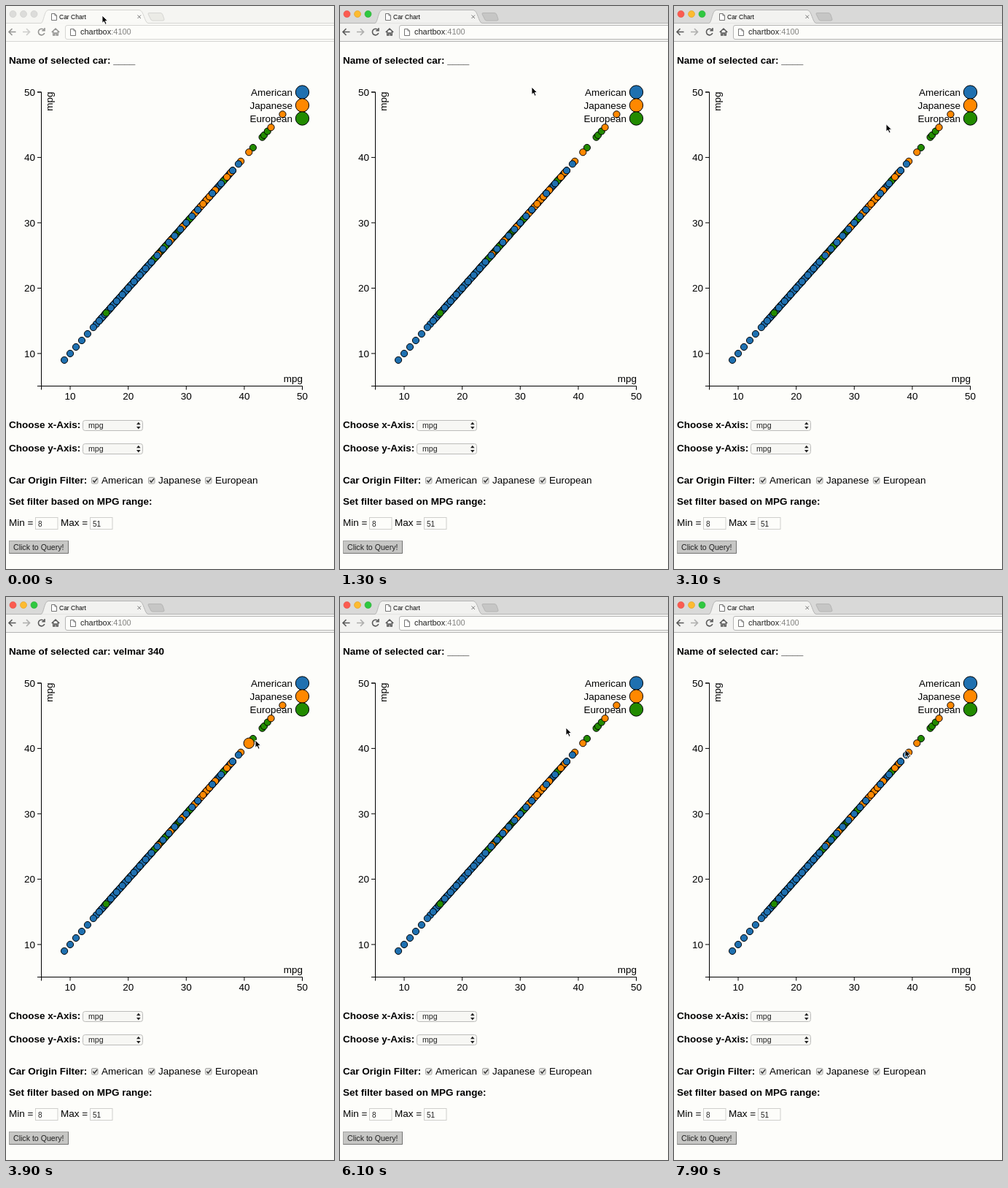
Recreate the animation shown at these times as an HTML page. Size 450 px wide and 771 px high, loop 8 s.

```html
<!DOCTYPE html>
<html lang="en">
<head>
<meta charset="utf-8">
<title>Car Chart</title>
<style>
html, body { margin: 0; width: 100%; height: 100%; overflow: hidden; background: #fdfdfa; }
svg { display: block; width: 450px; height: 771px; }
text { font: 13.5px "Liberation Sans", Arial, sans-serif; fill: #000; white-space: pre; }
.b { font-weight: bold; }
.end { text-anchor: end; }
.mid { text-anchor: middle; }
.ui { font-size: 10.6px; fill: #222; }
.axis { fill: none; stroke: #000; }
#dots circle, #legend circle { stroke: #000; }
#bar { --strip: #d9d9d8; --tool: #f2f2f0; --edge: #b5b5b4; --ink: #5a5a5a; --new: #c6c6c5; }
#bar.idle { --strip: #f5f5f2; --tool: #fafaf7; --edge: #d6d6d3; --ink: #949492; --new: #ebebe6; }
#bar.idle .light { fill: #dcdcda; stroke: #cacac8; }
.strip { fill: var(--strip); }
.tool { fill: var(--tool); }
.new { fill: var(--new); }
.edge { stroke: var(--edge); }
.icon { fill: none; stroke: var(--ink); stroke-width: 1.6; }
.page { fill: #fff; stroke: #666; stroke-width: .9; }
.light { stroke-width: .6; }
</style>
</head>
<body>
<svg viewBox="0 0 450 771">
  <g id="bar">
    <rect class="strip" width="450" height="24"/>
    <rect class="tool" y="24" width="450" height="24.5"/>
    <path class="tool edge" d="M0 23.5H48C52 23 52 6 58 5.5H183C189 6 190 23 195 23.5H450"/>
    <path class="new edge" d="M196 9.5H212Q214 9.5 215 12L217 18Q217.5 20 215 20H201Q199 20 198 17L195 11Q195 9.5 196 9.5Z"/>
    <path class="edge" d="M0 48.5H450"/>
    <circle class="light" cx="9.5" cy="11" r="4.5" fill="#fb5b50" stroke="#df483f"/>
    <circle class="light" cx="24" cy="11" r="4.5" fill="#fdbb30" stroke="#dc9c25"/>
    <circle class="light" cx="38.5" cy="11" r="4.5" fill="#2fc840" stroke="#20a42d"/>
    <path class="page" d="M62.5 10.5H67L69.5 13V19.5H62.5ZM67 10.5V13H69.5"/>
    <text x="73" y="17.5" style="font-size:8.5px">Car Chart</text>
    <path d="M180.5 12.5L185 17M185 12.5L180.5 17" stroke="#777"/>
    <path class="icon" d="M13.5 35.5H4M8.5 31L4 35.5L8.5 40"/>
    <path class="icon" d="M23 35.5H32.5M28 31L32.5 35.5L28 40" opacity=".45"/>
    <path class="icon" d="M52 32.7A4.3 4.3 0 1 0 52.8 37M53 30V33.7H49.3"/>
    <path class="icon" d="M62.8 36L68 31L73.2 36M64.8 35V40H66.8V37H69.2V40H71.2V35"/>
    <path class="edge" d="M450 26.5H84Q81.5 26.5 81.5 29V43Q81.5 45.5 84 45.5H450" fill="#fdfdfa"/>
    <path class="page" d="M88.5 31.5H93L95.5 34V40.5H88.5ZM93 31.5V34H95.5"/>
    <text class="ui" x="102" y="39.3" style="font-size:11px">chartbox<tspan fill="#848482">:4100</tspan></text>
  </g>

  <text class="b" x="4" y="79">Name of selected car: <tspan id="name">____</tspan></text>

  <g id="axes">
    <path class="axis" d="M43 118H48.5V520.5H43M48.5 525.5V520.5H406.5V525.5"/>
    <text class="end" x="407" y="515">mpg</text>
    <text class="end" transform="translate(64 117.5) rotate(-90)">mpg</text>
  </g>
  <g id="dots"></g>
  <g id="legend"></g>

  <text class="b" x="4" y="578">Choose x-Axis:</text>
  <text class="b" x="4" y="610">Choose y-Axis:</text>
  <text class="b" x="4" y="654">Car Origin Filter:</text>
  <text class="b" x="4" y="683">Set filter based on MPG range:</text>
  <text x="4" y="712">Min =</text>
  <text x="75" y="712">Max =</text>
  <g id="form"></g>
  <rect x="4.5" y="732.5" width="81" height="17" fill="#c6c6c4" stroke="#a6a6a4"/>
  <path d="M4.5 749.5H85.5V732.5" fill="none" stroke="#747472"/>
  <text class="ui" x="10" y="744.5">Click to Query!</text>

  <path id="cursor" d="M0 0V10.3L2.4 8.2L4.2 12.2L6.1 11.4L4.3 7.5H7.6Z" stroke="#fff" stroke-width=".9"/>
</svg>

<script>
const $ = id => document.getElementById(id);

function add(parent, tag, attrs, text = "") {
  const el = document.createElementNS("http://www.w3.org/2000/svg", tag);
  for (const key in attrs) el.setAttribute(key, attrs[key]);
  el.textContent = text;
  return $(parent).appendChild(el);
}

function range(from, to, step = 1) {
  const count = Math.round((to - from) / step) + 1;
  return Array.from({ length: count }, (_, i) => from + i * step);
}

const BLUE = "#1f70b0", ORANGE = "#ff8800", GREEN = "#228b00";
const px = v => 8.4 + 7.963 * v;
const py = v => 565.4 - 8.95 * v;

for (const v of range(10, 50, 10)) {
  const x = px(v), y = py(v);
  add("axes", "path", { class: "axis", d: `M${x} 520.5v5M43 ${y}h5.5` });
  add("axes", "text", { class: "mid", x, y: 539 }, v);
  add("axes", "text", { class: "end", x: 40, y: y + 4.7 }, v);
}

// Dots lie on the diagonal: a dense run below, then regular steps, then single cars.
const dots = {};
function plot(fill, values) {
  for (const v of values)
    dots[v] = add("dots", "circle", { cx: px(v), cy: py(v), r: 4.6, fill });
}
plot(BLUE, range(15, 38, .25));
plot(GREEN, range(16.2, 30.6, .6));
plot(ORANGE, range(21, 29.4, 2.1));
plot(ORANGE, range(31.5, 35, .5));
plot(BLUE, range(14.5, 23.5));
plot(BLUE, range(9, 32));
plot(GREEN, [16.2, 36.4, 41.5, 43.1, 43.4, 44]);
plot(ORANGE, [32.9, 34, 37.7, 37, 39.4, 40.8, 44.6, 46.6]);
plot(BLUE, [34.5, 36, 38, 39]);

["American", "Japanese", "European"].forEach((label, i) => {
  const y = 118 + 18 * i, x = 117 + 78 * i;
  add("legend", "circle", { cx: 406.5, cy: y, r: 9.2, fill: [BLUE, ORANGE, GREEN][i] });
  add("legend", "text", { class: "end", x: 393, y: y + 4.7 }, label);
  add("form", "rect", { x: x + .5, y: 645.5, width: 8.5, height: 8.5, rx: 1.5, fill: "#e6e6e4", stroke: "#a3a3a1" });
  add("form", "path", { d: `M${x + 2.3} 649.8l2 2.3l3.8-5`, fill: "none", stroke: "#333", "stroke-width": 1.5 });
  add("form", "text", { x: x + 14, y: 654 }, label);
});

for (const y of [567, 599]) {
  add("form", "rect", { x: 105.5, y: y + .5, width: 82, height: 14, rx: 3, fill: "#f7f7f4", stroke: "#bcbcba" });
  add("form", "text", { class: "ui", x: 113, y: y + 11 }, "mpg");
  add("form", "path", { d: `M179 ${y + 6.3}l2.8-3.6l2.8 3.6zm0 2.6l2.8 3.6l2.8-3.6z`, fill: "#222" });
}
for (const [x, value] of [[40, 8], [115, 51]]) {
  add("form", "rect", { x: x + .5, y: 700.5, width: 30.5, height: 16, fill: "#fdfdfa", stroke: "#cfcfcc" });
  add("form", "text", { class: "ui", x: x + 4, y: 712.5, style: "font-size:10px" }, value);
}

// Cursor stops: time, x, y
const path = [
  [0, 132, 13], [300, 132, 13], [1300, 263, 111], [2300, 174, 58], [3500, 332, 198],
  [3900, 342, 196], [5000, 339, 193], [5200, 324, 172], [7000, 296, 186], [7900, 317, 209]
];
const hovers = [
  { dot: 40.8, from: 3500, to: 4000, name: "velmar 340" },
  { dot: 41.5, from: 4000, to: 5100, name: "tolva hare" }
];

function cursorAt(t) {
  const i = path.findIndex(p => p[0] > t);
  if (i < 0) return path.at(-1).slice(1);
  const [t0, x0, y0] = path[i - 1], [t1, x1, y1] = path[i];
  const u = (t - t0) / (t1 - t0), e = u * u * (3 - 2 * u);
  return [x0 + (x1 - x0) * e, y0 + (y1 - y0) * e];
}

function draw() {
  const t = Math.floor(performance.now() % 8000 / 100) * 100;
  $("bar").setAttribute("class", t < 300 ? "idle" : "");
  $("cursor").setAttribute("transform", `translate(${cursorAt(t)})`);
  const active = hovers.find(h => t >= h.from && t < h.to);
  $("name").textContent = active ? active.name : "____";
  for (const h of hovers) {
    const big = t >= h.from + 100 && t < h.to + 200;
    dots[h.dot].setAttribute("r", big ? 7.2 : 4.6);
  }
  requestAnimationFrame(draw);
}
draw();
</script>
</body>
</html>
```
